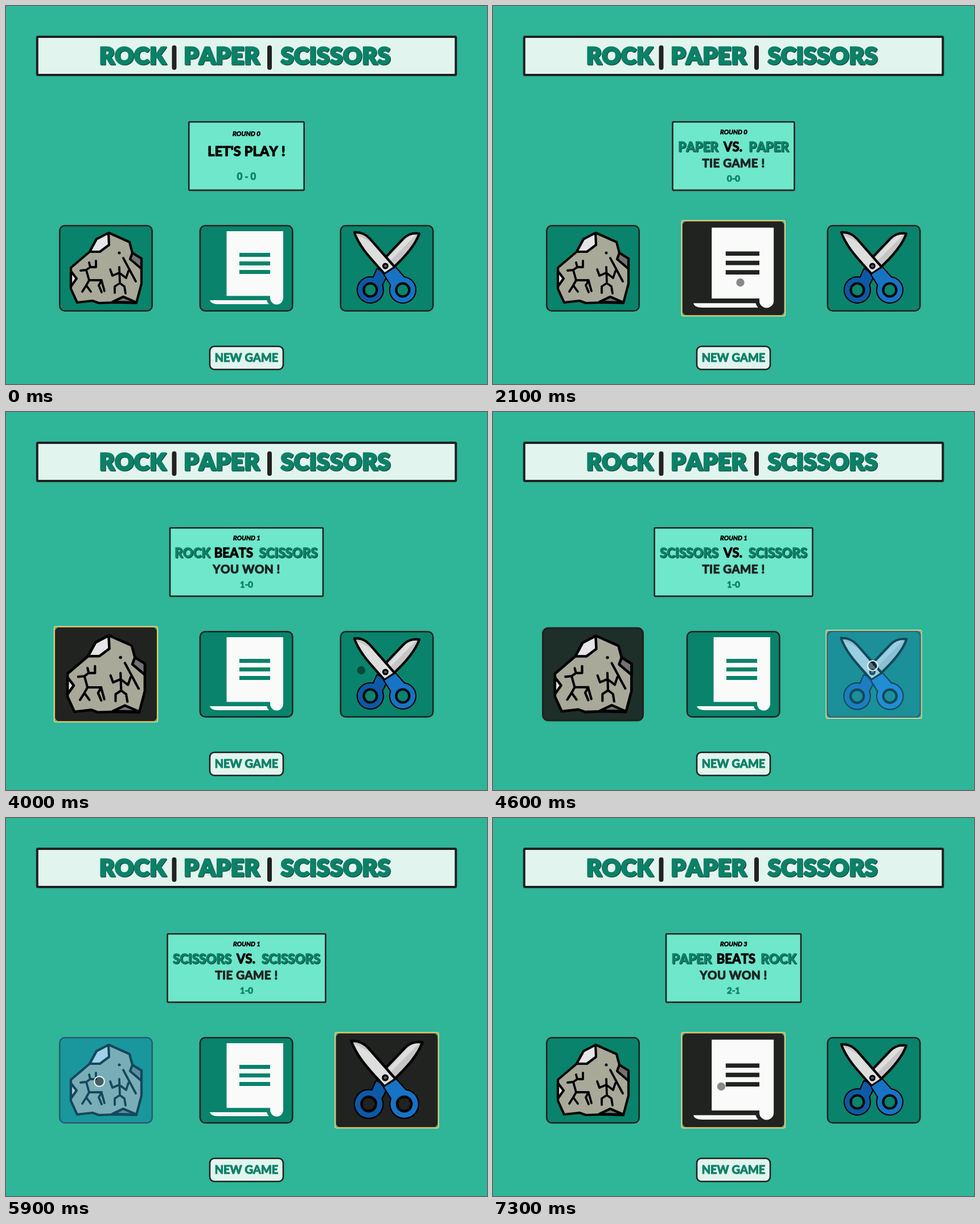
An HTML page that plays this animation: 845x663 px, repeating every 8 s.

```html
<!DOCTYPE html>
<html lang="en">
<head>
<meta charset="utf-8">
<title>Rock Paper Scissors</title>
<style>
  html, body { margin: 0; width: 100%; height: 100%; overflow: hidden; background: #2fb597; }
  svg { display: block; width: 845px; height: 663px; }
  text { font: 700 20px Lato, "Open Sans", sans-serif; font-kerning: none; text-anchor: middle;
         stroke-width: .06em; stroke-linejoin: round; }
  #title text { font-weight: 900; }
  .green { fill: #0a8268; stroke: #0a8268; }
  .dark { fill: #1f2624; stroke: #1f2624; }
  .black { fill: #000; stroke: #000; }
  .shade { filter: drop-shadow(1px 1px 0 #1f3b34); }
  .italic { font-style: italic; }
  .frame { stroke: #1f2120; stroke-width: 2.6; }
  .ink { stroke: #000; stroke-width: 4.2; stroke-linejoin: round; stroke-linecap: round; }
</style>
</head>
<body>
<svg viewBox="0 0 845 663">
  <rect width="845" height="663" fill="#2fb597"/>
  <rect x="54.8" y="54" width="735.5" height="67" rx="1.5" fill="#e2f4ee" stroke="#1f2120" stroke-width="4"/>
  <g id="title"></g>
  <path d="M295.5 73V108M463 73V108" stroke="#222" stroke-width="8" stroke-linecap="round"/>
  <g id="board"></g>
  <g id="cards"></g>
  <rect class="frame" x="358" y="597" width="129" height="40.5" rx="8" fill="#e2f4ee"/>
  <g id="reset"></g>
  <circle id="dot"/>
</svg>
<script>
const $ = id => document.getElementById(id);
const clamp = v => Math.max(0, Math.min(1, v));
const mix = (a, b, p) => a + (b - a) * p;
const text = (x, y, size, str, cls, gap = 0) =>
  `<text x="${x}" y="${y}" class="${cls}" style="font-size:${size}px;letter-spacing:${gap}px">${str}</text>`;

const LOOP = 8000, STEP = 100, MOVE = 120, MID = 422.5;
const GREEN = [9, 131, 107], DARK = [33, 35, 33];
const WIDTH = { ROCK: 61, PAPER: 72, SCISSORS: 104, BEATS: 70, 'VS.': 36 };

const rounds = [
  { press: 1800, start: 1890, card: 1, no: 0, words: 'PAPER VS. PAPER', verdict: 'TIE GAME !', score: '0-0' },
  { press: 3210, start: 3210, card: 0, no: 1, words: 'ROCK BEATS SCISSORS', verdict: 'YOU WON !', score: '1-0' },
  { press: 4500, start: 4575, card: 2, no: 1, words: 'SCISSORS VS. SCISSORS', verdict: 'TIE GAME !', score: '1-0' },
  { press: 5900, start: 5990, card: 0, no: 2, words: 'ROCK BEATS PAPER', verdict: 'YOU LOSE !', score: '1-1' },
  { press: 7100, start: 7150, card: 1, no: 3, words: 'PAPER BEATS ROCK', verdict: 'YOU WON !', score: '2-1' },
];

// pointer path: time, x, y
const path = [
  [900, 219, 182], [1100, 386, 433], [1200, 386, 433], [1500, 434.5, 485], [2400, 434.5, 485],
  [2700, 190, 447], [2800, 190, 447], [2900, 173, 447], [3500, 173, 447], [3800, 420, 439],
  [4000, 624, 453], [4100, 624, 453], [4200, 655, 446], [4300, 655, 446], [4400, 667, 445],
  [5000, 667, 445], [5300, 414.5, 452], [5400, 414.5, 452], [5700, 164, 462], [6200, 164, 462],
  [6500, 304, 465], [6600, 304, 465], [6900, 401, 471], [LOOP, 401, 471],
];

const rock = `
  <path class="ink" fill="#a8a999" d="M181 398L217 414 222 433 238 443V487L229 521 192 520 163 521 152 517 125 520 114 496V459L147 431 159 409Z"/>
  <g class="ink">
    <path fill="#e6e6e8" d="M147 431L159 409 180 398 181 419 165 431Z"/>
    <path fill="#e6e6e8" d="M114 465L124 478 114 492Z"/>
    <path fill="#737372" d="M222 433L238 443V461L218 444Z"/>
    <path fill="#737372" d="M187 519L206 510 229 520Z"/>
  </g>
  <path class="ink" style="stroke-width:3.800" fill="none" d="M206 442L228 483M131 464L141 463 146 481H168M146 450L148 458H158V447M148 458L141 463
    M146 481L141 490 134 501M141 490L149 501M168 481L163 490 168 502M168 482L173 500
    M199 458L200 486M183 462L187 473 199 468 211 477 215 465M200 486L191 492V503M200 486L208 492 210 504"/>
  <circle cx="199" cy="433" r="2.500"/>`;

const paper = `
  <path fill="#f9faf9" d="M387.500 395H487V512a11.500 11.500 0 0 1-23 0V508.500H387.500ZM358 516H458q1 4 4 7H372q-12 0-14-7Z"/>
  <path stroke="currentColor" stroke-width="7" d="M410 436.500h54M410 451.500h54M410 466.500h54"/>`;

// the ring and its arm are inked first, then filled again to merge them
const handle = (x, arm, fill) => {
  const shape = `<path d="${arm}"/><circle cx="${x}" cy="498" r="22"/>`;
  return `<g class="ink" fill="${fill}">${shape}</g><g fill="${fill}">${shape}</g>
    <circle class="ink" cx="${x}" cy="498" r="11.500" fill="currentColor"/>`;
};
const scissors = `
  <path class="ink" fill="#c6c6c6" d="M726 399Q709 397 698 408L658 450 676 463C697 444 719 421 726 399Z"/>
  <path fill="#dedede" d="M721 401Q709 400 701 409L667 446 672 450Z"/>
  ${handle(640, 'M652 462L670 470 660 490 645 478Z', '#0d59a6')}
  <path class="ink" fill="#dedede" d="M612 397Q628 396 640 409L683 458 665 470C644 446 621 424 612 397Z"/>
  <path fill="#c6c6c6" d="M615 400Q628 399 637 409L644 417Q630 407 616 402Z"/>
  ${handle(697, 'M665 471L684 459 700 477 677 490Z', '#1673c6')}
  <circle cx="666.500" cy="456" r="4" fill="#555" stroke="#000" stroke-width="3"/>`;

const cards = [[175.5, rock], [422.2, paper], [669, scissors]].map(([x, icon]) => {
  const box = (pad, r, rest) => `<rect x="${x - 82.5 + pad}" y="${384 + pad}" width="${165 - 2 * pad}" height="${152 - 2 * pad}" rx="${r}" ${rest}/>`;
  $('cards').insertAdjacentHTML('beforeend', `<g>
    ${box(1.3, 9, 'class="frame" fill="currentColor"')}${icon}
    <g>${box(.3, 3, 'fill="none" stroke="#d99c24" stroke-width="1.4"')}${box(-.7, 3, 'fill="none" stroke="#f0ead0" stroke-width="1"')}</g>
    ${box(0, 6, 'fill="rgb(51,181,229)"')}</g>`);
  const el = $('cards').lastElementChild;
  return { x, el, ring: el.lastElementChild.previousElementSibling, tint: el.lastElementChild };
});

$('title').innerHTML = [[222.5, 'ROCK'], [379, 'PAPER'], [579, 'SCISSORS']]
  .map(([x, word]) => text(x, 101.5, 41, word, 'green shade', .3)).join('');
$('reset').innerHTML = text(MID, 624, 20, 'NEW GAME', 'green');

function board(round) {
  const frame = w => `<rect class="frame" x="${MID - w / 2 + 1.3}" y="203.3" width="${w - 2.6}" height="119.8" rx="1.5" fill="#6ee7cb"/>`;
  if (!round) return frame(205)
    + text(MID, 228, 11.5, 'ROUND 0', 'black italic')
    + text(MID, 263, 23.5, "LET'S PLAY !", 'black', .2)
    + text(MID, 305, 16.5, '0 - 0', 'green');
  const words = round.words.split(' ');
  const total = words.reduce((sum, w) => sum + WIDTH[w], 16);
  let x = MID - total / 2;
  const line = words.map((w, i) => {
    const mid = x + WIDTH[w] / 2;
    x += WIDTH[w] + (i ? 9 : 7);
    return text(mid, 254.5, 22, w, i === 1 ? 'black' : 'green shade', .2);
  }).join('');
  return frame(total + 20.5) + line
    + text(423, 224.5, 11.2, 'ROUND ' + round.no, 'black italic')
    + text(MID, 283, 20.5, round.verdict, 'dark', .4)
    + text(MID, 308, 15, round.score, 'green');
}

function drawDot(t, pressed) {
  const i = path.findIndex(p => p[0] > t), dot = $('dot');
  dot.style.display = i < 1 ? 'none' : '';
  if (i < 1) return;
  const [a, b] = [path[i - 1], path[i]], p = (t - a[0]) / (b[0] - a[0]);
  dot.setAttribute('cx', mix(a[1], b[1], p));
  dot.setAttribute('cy', mix(a[2], b[2], p));
  dot.setAttribute('r', pressed ? 8.8 : 7.2);
  dot.setAttribute('fill', 'rgba(0,0,0,.45)');
  dot.setAttribute('stroke', pressed ? '#f4f4f4' : 'none');
  dot.setAttribute('stroke-width', 2);
}

let shown = null;
function draw(t) {
  const round = rounds.findLast(r => t >= r.start);
  const last = rounds[rounds.indexOf(round) - 1];
  const touch = rounds.findLast(r => t >= r.press);
  const glow = touch ? clamp((touch.start + 110 - t) / 70) : 0;
  if (round !== shown) $('board').innerHTML = board(shown = round);

  const p = round ? clamp((t - round.start) / MOVE) : 0, ease = p * p * (3 - 2 * p);
  cards.forEach(({ x, el, ring, tint }, i) => {
    const grown = mix(last?.card === i, round?.card === i, ease);
    el.setAttribute('transform', `translate(${x} 460) scale(${1 + .095 * grown}) translate(${-x} -460)`);
    el.style.color = `rgb(${GREEN.map((c, k) => mix(c, DARK[k], grown))})`;
    ring.style.display = round?.card === i ? '' : 'none';
    tint.style.opacity = touch?.card === i ? .4 * glow : 0;
  });
  drawDot(t, glow > 0);
}

const begin = performance.now();
function tick() {
  const t = (performance.now() - begin) % LOOP;
  draw(Math.floor(t / STEP) * STEP);
  requestAnimationFrame(tick);
}
tick();
</script>
</body>
</html>
```
